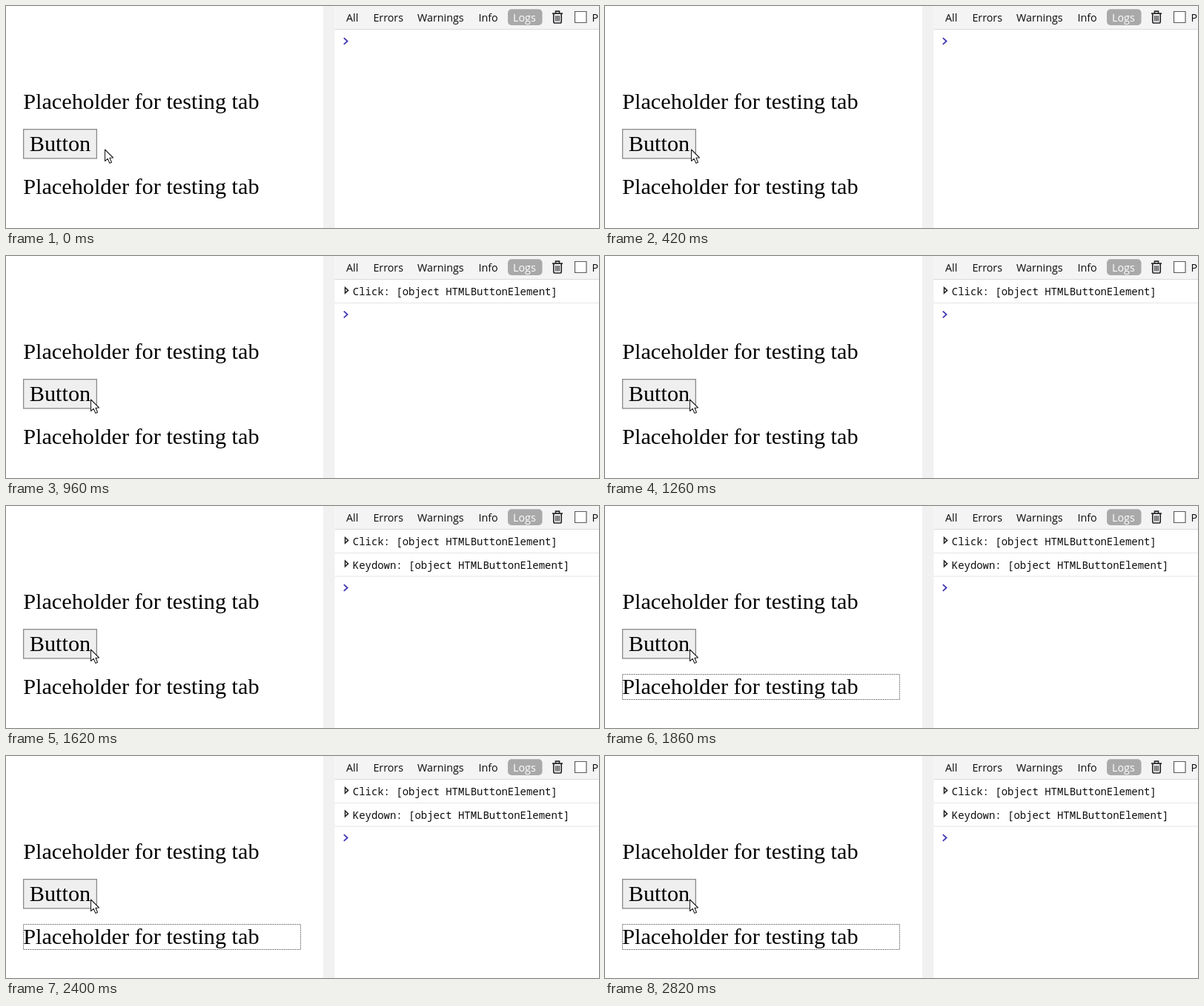
An HTML page with a canvas that plays this animation: 800 px wide and 300 px high, repeating every 2.88 s.

```html
<!DOCTYPE html>
<html lang="en">
<head>
<meta charset="utf-8">
<title>Button focus demo</title>
<style>
html, body { margin: 0; width: 100%; height: 100%; overflow: hidden; background: #fff; }
canvas { display: block; width: 800px; height: 300px; }
</style>
</head>
<body>
<canvas id="stage" width="800" height="300"></canvas>
<script>
const ctx = document.getElementById('stage').getContext('2d');
const LOOP = 2880, STEP = 60;
const CLICK_AT = 900, KEY_AT = 1620, FOCUS_AT = 1680;
const ROW = 31.5;
const SERIF = '30.25px "Liberation Serif", "Times New Roman", serif';
const UI = '14.3px "Open Sans", "Noto Sans", sans-serif';
const MONO = '13.95px "Noto Sans Mono", "DejaVu Sans Mono", monospace';

function text(str, x, y, font, color = '#0c0c0d') {
  ctx.font = font;
  ctx.fillStyle = color;
  ctx.fillText(str, x, y);
}

function rect(x, y, w, h, color) {
  ctx.fillStyle = color;
  ctx.fillRect(x, y, w, h);
}

function path(points, closed) {
  ctx.beginPath();
  points.forEach(([x, y]) => ctx.lineTo(x, y));
  if (closed) ctx.closePath();
}

function stroke(color, width) {
  ctx.strokeStyle = color;
  ctx.lineWidth = width;
  ctx.stroke();
}

function drawPage(focused) {
  text('Placeholder for testing tab', 23.2, 139, SERIF, '#000');
  rect(23, 166, 100, 40.6, '#8a8a8a');
  rect(24.3, 167.3, 97.4, 38, '#efefef');
  text('Button', 31.8, 196, SERIF, '#000');
  text('Placeholder for testing tab', 23.2, 254, SERIF, '#000');
  if (focused) {
    ctx.setLineDash([2, 1]);
    ctx.beginPath();
    ctx.rect(23.5, 227.5, 374, 34);
    stroke('#777', 1);
    ctx.setLineDash([]);
  }
}

function drawTrash() {
  ctx.beginPath();
  ctx.moveTo(737, 10.2);
  ctx.lineTo(751, 10.2);
  ctx.moveTo(741.5, 10);
  ctx.lineTo(741.5, 7.2);
  ctx.lineTo(746.5, 7.2);
  ctx.lineTo(746.5, 10);
  ctx.moveTo(738.8, 11);
  ctx.lineTo(738.8, 21.3);
  ctx.quadraticCurveTo(738.8, 23, 740.5, 23);
  ctx.lineTo(747.5, 23);
  ctx.quadraticCurveTo(749.2, 23, 749.2, 21.3);
  ctx.lineTo(749.2, 11);
  stroke('#2b2b2d', 1.7);
  ctx.beginPath();
  for (const x of [741.8, 744, 746.2]) {
    ctx.moveTo(x, 13);
    ctx.lineTo(x, 20.5);
  }
  stroke('#2b2b2d', 1.2);
}

function drawToolbar() {
  rect(428, 0, 15.5, 300, '#f1f1f1');
  rect(443.5, 0, 356.5, 31, '#f4f4f5');
  rect(443.5, 31, 356.5, 1, '#ddd6dc');
  ctx.beginPath();
  ctx.roundRect(677, 4.2, 46.5, 21.8, 5);
  ctx.fillStyle = '#a9a9a9';
  ctx.fill();
  text('All', 459, 21, UI);
  text('Errors', 495.4, 21, UI);
  text('Warnings', 555, 21, UI);
  text('Info', 637.4, 21, UI);
  text('Logs', 684, 21, UI, '#fff');
  drawTrash();
  ctx.beginPath();
  ctx.rect(767.5, 7.5, 15.5, 15);
  ctx.fillStyle = '#fff';
  ctx.fill();
  stroke('#5c5c5c', 1.2);
  text('P', 790.4, 21, UI);
}

function drawLog(name, top) {
  path([[457.5, top + 10.6], [461.6, top + 14.4], [457.5, top + 18.2]], true);
  stroke('#222', 1.5);
  text(name + ': [object HTMLButtonElement]', 467.8, top + 21.2, MONO);
  rect(443.5, top + ROW - 0.5, 356.5, 1, '#e6e6e8');
}

function drawConsole(logs) {
  logs.forEach((name, i) => drawLog(name, 32 + i * ROW));
  const y = 47.5 + logs.length * ROW;
  path([[455.8, y - 4.4], [460.6, y], [455.8, y + 4.4]]);
  stroke('#4037b4', 1.8);
}

function drawCursor(x, y) {
  ctx.save();
  ctx.translate(x, y);
  path([[0, 0], [0, 15.5], [3.6, 12.3], [6.3, 18.4], [9, 17.2],
        [6.4, 11.3], [11, 11]], true);
  ctx.fillStyle = '#fff';
  ctx.fill();
  ctx.lineJoin = 'round';
  stroke('#222', 1.1);
  ctx.restore();
}

function draw(t) {
  const logs = [];
  if (t >= CLICK_AT) logs.push('Click');
  if (t >= KEY_AT) logs.push('Keydown');
  rect(0, 0, 800, 300, '#fff');
  drawPage(t >= FOCUS_AT);
  drawToolbar();
  drawConsole(logs);
  const left = 1 - Math.min(t / 600, 1);
  drawCursor(114.5 + 19 * left ** 1.87, 194);
}

const start = performance.now();
function tick() {
  const t = (performance.now() - start) % LOOP;
  draw(Math.floor(t / STEP) * STEP);
  requestAnimationFrame(tick);
}
tick();
</script>
</body>
</html>
```
